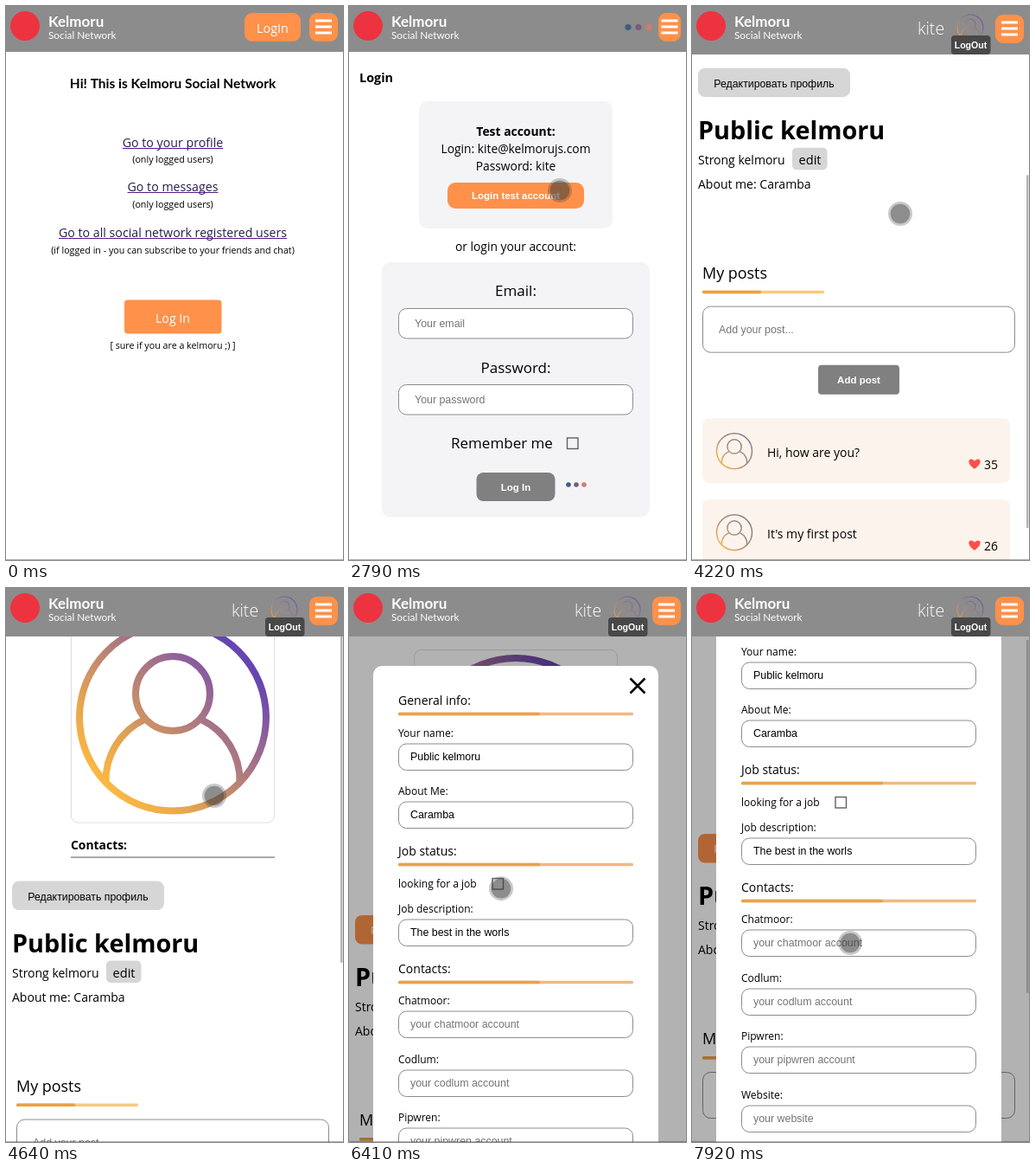
An HTML page with a canvas for the animation above (8 s loop, 390 by 640 pixels).

```html
<!DOCTYPE html>
<html lang="en">
<head>
<meta charset="utf-8">
<title>Kelmoru Social Network</title>
<style>
html, body { margin: 0; width: 100%; height: 100%; overflow: hidden; background: #fff; }
canvas { display: block; width: 390px; height: 640px; }
</style>
</head>
<body>
<canvas id="stage"></canvas>
<script>
const W = 390, H = 640, LOOP = 8000;
const canvas = document.getElementById('stage');
const ctx = canvas.getContext('2d');
const dpr = window.devicePixelRatio || 1;
canvas.width = W * dpr;
canvas.height = H * dpr;

const UI = '"Open Sans", "Noto Sans", sans-serif';
const ARIAL = '"Liberation Sans", Arial, sans-serif';
const LATO = 'Lato, sans-serif';
const ORANGE = '#ff914a', GRAY = '#808080', CARD = '#f4f4f7', LINE = '#8c8c8c', HINT = '#757575';
const PAGE_H = 1004;

// Times in ms of the state changes
const LOGIN_AT = 1080, TAP_AT = 2400, LOADING_AT = 2510, PROFILE_AT = 2900, POPUP_AT = 5740;

const cursorTrack = [
  [200, 354, 604], [440, 285, 470], [680, 226, 362], [950, 226, 362], [1280, 208, 359],
  [1480, 208, 359], [1760, 203, 292], [2040, 222, 220], [2370, 222, 220],
  [2790, 244, 213], [3000, 243, 226], [3800, 243, 226], [4220, 241, 240], [5320, 241, 240],
  [5530, 210, 325], [5690, 150, 395], [5780, 150, 395], [6070, 184, 200], [6130, 184, 200],
  [6410, 176, 347], [6750, 182, 403], [7010, 182, 403], [7780, 187, 402], [7920, 183, 410]
];
const scrollTrack = [
  [3800, 0], [3950, 90], [4220, 306], [4290, 330], [4360, 318], [4570, 40], [4640, 40], [4710, 0],
  [7010, 0], [7400, 52], [7780, 94]
];

function at(track, t) {
  let i = 0;
  while (i < track.length - 1 && track[i + 1][0] <= t) i++;
  const a = track[i], b = track[i + 1] || a;
  const k = b === a ? 0 : Math.max(0, (t - a[0]) / (b[0] - a[0]));
  return a.slice(1).map((v, j) => v + (b[j + 1] - v) * k);
}

function text(str, x, y, size, { color = '#000', font = UI, weight = 400, align = 'left' } = {}) {
  ctx.font = `${weight} ${size}px ${font}`;
  ctx.fillStyle = color;
  ctx.textAlign = align;
  ctx.fillText(str, x, y);
  return ctx.measureText(str).width;
}
const mid = (str, y, size, opt) => text(str, 193, y, size, { align: 'center', ...opt });

function box(x, y, w, h, r, fill, stroke) {
  ctx.beginPath();
  ctx.roundRect(x, y, w, h, r);
  if (fill) { ctx.fillStyle = fill; ctx.fill(); }
  if (stroke) { ctx.strokeStyle = stroke; ctx.lineWidth = 1; ctx.stroke(); }
}

function disc(x, y, r, color) {
  ctx.beginPath();
  ctx.arc(x, y, r, 0, 7);
  ctx.fillStyle = color;
  ctx.fill();
}

function lines(color, width, ...segs) {
  ctx.strokeStyle = color;
  ctx.lineWidth = width;
  ctx.beginPath();
  for (const [x1, y1, x2, y2] of segs) { ctx.moveTo(x1, y1); ctx.lineTo(x2, y2); }
  ctx.stroke();
}

function button(label, x, y, w, h, r, fill) {
  box(x, y, w, h, r, fill);
  text(label, x + w / 2, y + h / 2 + 4, 11.5,
    { color: '#fff', font: ARIAL, weight: 700, align: 'center' });
}

function field(x, y, w, h, value, tx, color = '#000') {
  box(x + .5, y + .5, w - 1, h - 1, 9, '#fff', LINE);
  text(value, tx, y + h / 2 + 4, 12.4, { font: ARIAL, color });
}

function checkbox(x, y) {
  ctx.strokeStyle = '#606060';
  ctx.lineWidth = 1.4;
  ctx.strokeRect(x, y, 12.5, 12.5);
}

function dots(x, y, gap, r) {
  ['#3c5f80', '#7a5a80', '#d27a6e'].forEach((c, i) => disc(x + i * gap, y, r, c));
}

function bar(x, y, w, split, left, right) {
  box(x, y, w, 3.5, 1.5, right);
  box(x, y, split, 3.5, 1.5, left);
}

function avatar(cx, cy, r, width, colors) {
  const s = r / 108;
  ctx.save();
  ctx.translate(cx, cy);
  ctx.scale(s, s);
  const g = ctx.createLinearGradient(-80, 80, 72, -72);
  colors.forEach((c, i) => g.addColorStop(i / (colors.length - 1), c));
  ctx.strokeStyle = g;
  ctx.lineWidth = width / s;
  const arcs = [[0, 0, 108, 0, 6.2832], [0, -27.5, 43, 0, 6.2832],
    [0, 72.6, 77.5, 3.11, 4.27], [0, 72.6, 77.5, 5.155, 6.315]];
  for (const a of arcs) { ctx.beginPath(); ctx.arc(...a); ctx.stroke(); }
  ctx.restore();
}

function heart(x, y) {
  ctx.fillStyle = '#ff4f48';
  ctx.beginPath();
  ctx.moveTo(x, y + 6);
  ctx.bezierCurveTo(x - 12, y - 2, x - 5, y - 9, x, y - 3);
  ctx.bezierCurveTo(x + 5, y - 9, x + 12, y - 2, x, y + 6);
  ctx.fill();
}

function menu(x, y, w) {
  box(x, y, w, 33, 9, ORANGE);
  const c = x + w / 2;
  lines('#fff', 2.8, ...[9, 16, 23].map(d => [c - 9.5, y + d, c + 9.5, y + d]));
}

function header(t) {
  const member = t >= PROFILE_AT;
  ctx.fillStyle = '#8c8c8c';
  ctx.fillRect(0, 0, W, member ? 56 : 53);
  disc(22, 23, 17, '#ee3340');
  text('Kelmoru', 49, 24, 17, { color: '#fff', font: LATO, weight: 700 });
  text('Social Network', 49, 38, 11.8, { color: '#fff', font: LATO });
  if (member) {
    text('kite', 261, 33, 19.5, { color: '#fff', weight: 300 });
    avatar(322, 25, 15, 1.1, ['#e0a050', '#a08088', '#7058a0']);
    box(300, 34, 45.5, 22, 4, '#484848');
    text('LogOut', 322.5, 49, 10.6, { color: '#fff', font: ARIAL, weight: 700, align: 'center' });
    menu(351, 10, 33);
  } else if (t >= LOADING_AT) {
    dots(323, 24.5, 12, 3.6);
    menu(358, 8, 26);
  } else {
    box(276, 8, 65, 33, 9, ORANGE);
    text('LogIn', 308.5, 31, 14.4, { color: '#fff', align: 'center' });
    menu(351, 8, 33);
  }
}

function home() {
  mid('Hi! This is Kelmoru Social Network', 95, 15.5, { font: LATO, weight: 700 });
  const links = [
    ['Go to your profile', 163, '(only logged users)', 181],
    ['Go to messages', 214, '(only logged users)', 233],
    ['Go to all social network registered users', 267,
      '(if logged in - you can subscribe to your friends and chat)', 286]
  ];
  for (const [label, y, note, noteY] of links) {
    const w = mid(label, y, 14.2, { color: '#2c1a4e' });
    lines('#551a8b', 1, [193 - w / 2, y + 1.5, 193 + w / 2, y + 1.5]);
    mid(note, noteY, 10.7);
  }
  box(137, 339.5, 112.5, 39, 4, ORANGE);
  mid('Log In', 366, 14.2, { color: '#fff' });
  mid('[ sure if you are a kelmoru ;) ]', 396, 10.7);
}

function login(t) {
  text('Login', 12, 88, 14.4, { weight: 700 });
  box(81, 110, 224, 147, 10, CARD);
  mid('Test account:', 150, 13.9, { weight: 700 });
  mid('Login: kite@kelmorujs.com', 170, 13.8);
  mid('Password: kite', 190, 13.8);
  button('Login test account', 114, 204, 158, 30, 9, t >= TAP_AT ? ORANGE : GRAY);
  mid('or login your account:', 283, 13.8);
  box(38, 296, 310, 294.5, 10, CARD);
  mid('Email:', 334.5, 17);
  field(57, 349, 272, 35.5, 'Your email', 76, HINT);
  mid('Password:', 423.5, 17);
  field(57, 437, 272, 35.5, 'Your password', 76, HINT);
  text('Remember me', 118, 511, 17);
  checkbox(252.5, 499);
  button('Log In', 147.5, 539, 91, 33, 8, GRAY);
  if (t >= LOADING_AT) dots(254, 553, 9, 2.8);
}

function post(y, message, likes) {
  box(12, y, 356, 75, 8, '#fcf3ec');
  avatar(49, y + 38, 20.5, 1.5, ['#f4b050', '#a09088', '#80808a']);
  text(message, 87, y + 45, 14);
  heart(327, y + 52.5);
  text(likes, 338, y + 58.5, 14);
}

function mix(a, b, k) {
  return `rgb(${a.map((v, i) => Math.round(v + (b[i] - v) * k))})`;
}

function profile(t) {
  box(75.5, 71.5, 235, 239, 8, '#fff', '#dcdcdc');
  avatar(193, 189, 108, 8, ['#fdb940', '#e3a452', '#bd8573', '#966695', '#6645b0']);
  text('Contacts:', 75, 341, 13.9, { weight: 700 });
  lines('#555', 1, [75, 350.5, 311, 350.5]);

  const k = Math.min(1, Math.max(0, (t - 5900) / 350));
  box(7, 378, 176, 33.5, 8, mix([214, 214, 214], [255, 145, 74], k));
  text('Редактировать профиль', 95, 400, 12.3,
    { font: ARIAL, align: 'center', color: mix([0, 0, 0], [255, 255, 255], k) });

  text('Public kelmoru', 7, 460, 28.8, { weight: 700 });
  text('Strong kelmoru', 7, 489, 14);
  box(116, 470, 40.5, 25.5, 5, '#d6d6d6');
  text('edit', 123.5, 489, 14.6);
  text('About me: Caramba', 7, 517, 14);

  text('My posts', 12, 621, 17.9);
  bar(12, 635, 141, 68, '#eba046', '#fbc97c');
  field(12, 653, 362, 54, 'Add your post...', 31, HINT);
  button('Add post', 146, 721, 94, 34, 4, GRAY);
  post(782.5, 'Hi, how are you?', '35');
  post(876.5, "It's my first post", '26');
}

function popup() {
  box(28, 90, 330, 900, 10, '#fff');
  lines('#000', 2.6, [325.5, 104.5, 342.5, 121.5], [342.5, 104.5, 325.5, 121.5]);
  for (const [label, y] of [['General info:', 135], ['Job status:', 309], ['Contacts:', 445]]) {
    text(label, 57, y, 14);
    bar(57, y + 8.7, 272, 164, '#e8a24e', '#f0b984');
  }
  const rows = [
    ['Your name:', 172, 'Public kelmoru'],
    ['About Me:', 239, 'Caramba'],
    ['Job description:', 375, 'The best in the worls'],
    ['Chatmoor:', 481, 'your chatmoor account', HINT],
    ['Codlum:', 549, 'your codlum account', HINT],
    ['Pipwren:', 616, 'your pipwren account', HINT],
    ['Website:', 684, 'your website', HINT]
  ];
  for (const [label, y, value, color] of rows) {
    text(label, 57, y, 12);
    field(57, y + 7.5, 272, 31.5, value, 71, color);
  }
  text('looking for a job', 57, 346, 12);
  checkbox(166, 335.5);
}

function scrollbar(y) {
  box(387, y * H / PAGE_H, 2.5, H * H / PAGE_H, 1, 'rgba(90,90,90,.45)');
}

function cursor(t) {
  if (t < 200) return;
  const [x, y] = at(cursorTrack, t);
  disc(x, y, 14, 'rgba(60,60,60,.28)');
  disc(x, y, 11.3, 'rgba(60,60,60,.42)');
}

function draw(t) {
  ctx.setTransform(dpr, 0, 0, dpr, 0, 0);
  ctx.fillStyle = '#fff';
  ctx.fillRect(0, 0, W, H);
  if (t < LOGIN_AT) home();
  else if (t < PROFILE_AT) login(t);
  else {
    const [y] = at(scrollTrack, t);
    ctx.save();
    ctx.translate(0, -y);
    profile(t);
    if (t >= POPUP_AT) {
      ctx.fillStyle = 'rgba(0,0,0,.3)';
      ctx.fillRect(0, y, W, H);
      popup();
    }
    ctx.restore();
    if ((t >= 3800 && t < 5180) || t >= 7010) scrollbar(y);
  }
  header(t);
  cursor(t);
  ctx.fillStyle = 'rgba(0,0,0,.3)';
  ctx.fillRect(0, 639, W, 1);
}

const start = performance.now();
function tick() {
  draw((performance.now() - start) % LOOP);
  requestAnimationFrame(tick);
}
tick();
</script>
</body>
</html>
```
